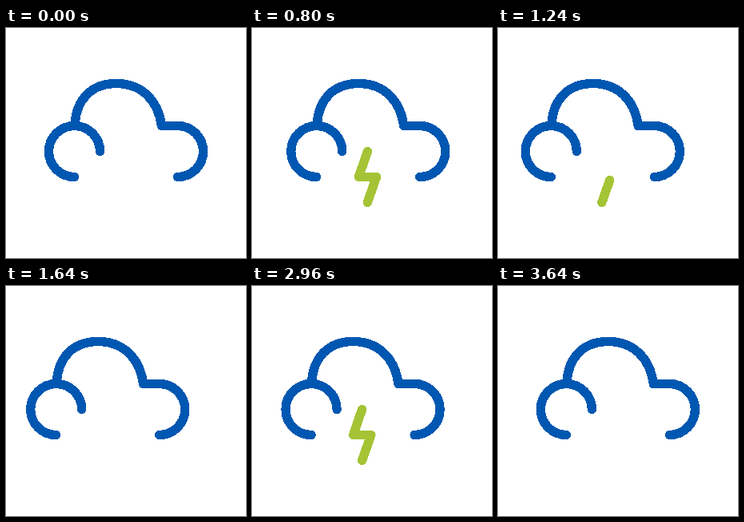
Write an HTML page that moves like this. It is 300 by 288 pixels and loops after 4 s.

```html
<!DOCTYPE html>
<html lang="en">
<head>
<meta charset="utf-8">
<title>Drifting storm cloud</title>
<style>
  html, body { margin: 0; width: 100%; height: 100%; overflow: hidden; background: #fff; }
  svg { display: block; width: 100vw; height: 100vh; shape-rendering: crispEdges; }
  path { fill: none; stroke-width: 11.4; stroke-linecap: round; stroke-linejoin: round; }
  #cloud { stroke: #0057b1; }
  #bolt { stroke: #a4c435; }
</style>
</head>
<body>
<svg viewBox="0 0 300 288">
  <g id="storm">
    <path id="cloud" d="M85.5 186.5A32 32 0 1 1 117.5 154.5M86 121C88 89 107 69.5 138 69.5C169 69.5 190 90 194.5 122.5H214.5A32 32 0 0 1 214.5 186.5"/>
    <path id="bolt" pathLength="100" d="M149 154.5L138.2 186.5H160.3L149 218.5"/>
  </g>
</svg>
<script>
const LOOP = 4000, RETURN_AT = 1960, DRIFT_MS = 2000, DRIFT = 23;
const storm = document.getElementById('storm');
const bolt = document.getElementById('bolt');

const progress = (t, from, to) => Math.min(1, Math.max(0, (t - from) / (to - from)));
const easeInOut = p => p < 0.5 ? 8 * p ** 4 : 1 - 8 * (1 - p) ** 4;

function draw(now) {
  const time = now % LOOP;
  const returning = time >= RETURN_AT;
  const t = returning ? time - RETURN_AT : time;
  const moved = easeInOut(progress(t, 0, DRIFT_MS));
  const x = -DRIFT * (returning ? 1 - moved : moved);
  storm.setAttribute('transform', `translate(${x.toFixed(3)} 0)`);

  // The bolt is drawn downwards, then erased downwards.
  const head = 100 * progress(t, 200, 460);
  const tail = 100 * progress(t, 1080, 1320);
  bolt.style.visibility = head > tail ? 'visible' : 'hidden';
  bolt.setAttribute('stroke-dasharray', `${head - tail} 200`);
  bolt.setAttribute('stroke-dashoffset', -tail);
}

const start = performance.now();
function tick() {
  draw(performance.now() - start);
  requestAnimationFrame(tick);
}
tick();
</script>
</body>
</html>
```
